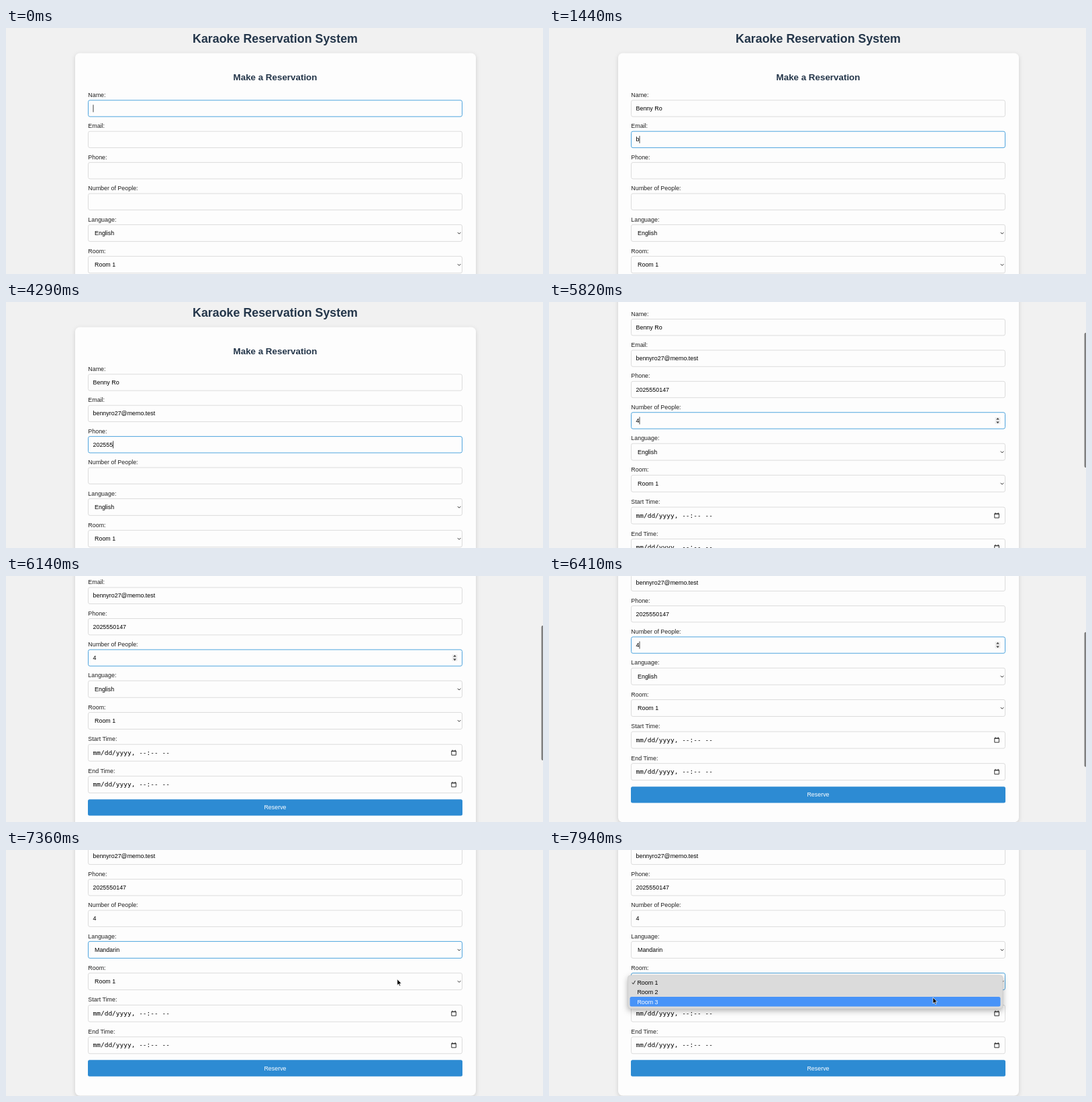
Animation, 800 px wide and 367 px high, one loop 7990 ms. Source, as an HTML page:

```html
<!DOCTYPE html>
<html lang="en">
<head>
<meta charset="utf-8">
<title>Karaoke Reservation System</title>
<style>
  html, body { margin: 0; width: 100%; height: 100%; overflow: hidden; background: #f1f1f1; }
  svg { display: block; width: 800px; height: 367px; }
  text { font: 8.92px "Liberation Sans", Arial, sans-serif; fill: #000; white-space: pre; }
  .label { fill: #222; }
  .heading { font-weight: bold; fill: #24364a; text-anchor: middle; }
  .date { font: 9.5px "DejaVu Sans Mono", monospace; }
  .white { fill: #fff; }
  .middle { text-anchor: middle; }
  .card { fill: #fdfdfd; filter: drop-shadow(0 2px 3px rgba(0, 0, 0, .14)); }
  .box { fill: #fdfdfd; stroke: #dcdcdc; }
  .box.focus { stroke: #4fa5de; }
  .icon { fill: none; stroke: #333; }
  .menu { fill: #dbdbdb; stroke: #c2c2c2; stroke-width: .5; filter: drop-shadow(0 3px 4px rgba(0, 0, 0, .3)); }
</style>
</head>
<body>
<svg viewBox="0 0 800 367">
  <g id="page">
    <text class="heading" x="401" y="22" style="font-size:17.85px">Karaoke Reservation System</text>
    <rect class="card" x="103" y="37.5" width="597" height="486" rx="7"/>
    <text class="heading" x="401" y="77.5" style="font-size:13.39px">Make a Reservation</text>
    <g id="form"></g>
    <rect x="122" y="470.3" width="558" height="24.4" rx="2.5" fill="#2d8bd3"/>
    <text class="white middle" x="401" y="485.6">Reserve</text>
    <rect id="caret" width=".8" height="11" fill="#111"/>
  </g>
  <rect id="thumb" x="797.5" width="4" height="201" rx="2" fill="#808080"/>
  <g id="menus"></g>
  <path id="pointer" d="M0 0V9L2.1 7.2L3.6 10.4L5 9.8L3.6 6.7H6.4Z" stroke="#fff" stroke-width=".7"/>
</svg>
<script>
const LOOP = 7990;
const $ = id => document.getElementById(id);
const clamp = (v, lo, hi) => Math.min(hi, Math.max(lo, v));
const show = (node, on) => node.setAttribute('visibility', on ? 'visible' : 'hidden');

// Fields: top edge of the box, height, and typing schedule where one exists
const fields = [
  { label: 'Name', top: 107.5, h: 25, focus: 0, text: 'Benny Ro', start: 200, step: 140 },
  { label: 'Email', top: 153.9, h: 25, focus: 1380, text: 'bennyro27@memo.test', start: 1430, step: 118 },
  { label: 'Phone', top: 200.3, h: 25, focus: 3820, text: '2025550147', start: 3870, step: 80 },
  { label: 'Number of People', top: 246.7, h: 25, focus: 4950, text: '4', start: 5350, step: 100 },
  { label: 'Language', top: 293.1, h: 25.6, focus: 6580, kind: 'select' },
  { label: 'Room', top: 340.3, h: 25.6, focus: 7450, kind: 'select' },
  { label: 'Start Time', top: 388, h: 25.6, kind: 'date' },
  { label: 'End Time', top: 435.5, h: 25.6, kind: 'date' }
];

const menus = [
  { top: 139.5, open: 6580, close: 7060, items: ['English', 'Mandarin', 'Korean', 'Japanese', 'Spanish', 'French', 'Other'],
    hover: t => t < 6680 ? 0 : 1 },
  { top: 187, open: 7450, close: LOOP, items: ['Room 1', 'Room 2', 'Room 3'],
    hover: t => t < 7600 ? 0 : t < 7760 ? 1 : 2 }
];

const pointerPath = [[6430, 612, 132], [6580, 607, 146], [6740, 605, 156], [7060, 605, 157],
                     [7400, 582, 194], [7480, 580, 195], [7820, 572, 220], [LOOP, 572, 220]];

function fieldMarkup({ label, top, h, kind }, i) {
  const mid = top + h / 2;
  const chevron = `<path class="icon" d="M672.8 ${mid - 1}l2.3 2.3l2.3 -2.3"/>`;
  const calendar = `<path class="icon" d="M663.8 ${mid - 2.7}h6.6v6.2h-6.6zM663.5 ${mid - 2.2}h7.2M665 ${mid - 4.3}v2M669.2 ${mid - 4.3}v2"/>`;
  const spinner = `<g id="spinner"><rect x="664.5" y="${mid - 5}" width="8" height="10" rx="1" fill="#eee"/>
    <path d="M666.2 ${mid - 1.5}h4.6l-2.3 -2.8zM666.2 ${mid + 1.5}h4.6l-2.3 2.8z" fill="#444"/></g>`;
  const extra = kind === 'select' ? chevron : kind === 'date' ? calendar : i === 3 ? spinner : '';
  const initial = kind === 'date' ? 'mm/dd/yyyy, --:-- --' : '';
  return `<text class="label" x="122.3" y="${top - 4.6}">${label}:</text>
    <rect class="box" id="box${i}" x="122.5" y="${top + .3}" width="557" height="${h - .6}" rx="2.5"/>
    <text class="${kind || ''}" id="value${i}" x="${kind === 'select' ? 132 : 129.5}" y="${mid + 3}">${initial}</text>${extra}`;
}

function menuMarkup({ top, items }, i) {
  const rows = items.map((item, n) =>
    `<text x="131.4" y="${top + 13.7 + n * 14.5}">${item}</text>`).join('');
  return `<g id="menu${i}">
    <rect class="menu" x="117.5" y="${top}" width="558.5" height="${items.length * 14.5 + 6.2}" rx="4"/>
    <rect class="hover" x="120.5" width="552" height="14.5" rx="2.5" fill="#4793f8"/>
    <path class="icon check" d="M123.8 ${top + 10.8}l1.7 2.3l3 -5.2"/>${rows}</g>`;
}

$('form').innerHTML = fields.map(fieldMarkup).join('');
$('menus').innerHTML = menus.map(menuMarkup).join('');

function pointerAt(t) {
  const n = clamp(pointerPath.findIndex(p => p[0] > t), 1, pointerPath.length - 1);
  const [t0, x0, y0] = pointerPath[n - 1], [t1, x1, y1] = pointerPath[n];
  const u = clamp((t - t0) / (t1 - t0), 0, 1), k = u * u * (3 - 2 * u);
  return [x0 + (x1 - x0) * k, y0 + (y1 - y0) * k];
}

function drawFields(t) {
  const active = fields.findLastIndex(f => f.focus <= t);
  fields.forEach((field, i) => {
    $('box' + i).classList.toggle('focus', i === active);
    if (!field.text) return;
    const count = clamp(Math.floor((t - field.start) / field.step) + 1, 0, field.text.length);
    const value = $('value' + i);
    value.textContent = field.text.slice(0, count);
    if (i !== active) return;
    const lastKey = count ? field.start + (count - 1) * field.step : field.focus;
    $('caret').setAttribute('x', 129.6 + (count ? value.getComputedTextLength() : 0));
    $('caret').setAttribute('y', field.top + 7);
    show($('caret'), Math.floor((t - lastKey) / 500) % 2 === 0);
  });
  if (!fields[active].text) show($('caret'), false);
  show($('spinner'), active === 3);
  $('value4').textContent = t < menus[0].close ? 'English' : 'Mandarin';
  $('value5').textContent = 'Room 1';
}

function drawMenu(menu, i, t) {
  const group = $('menu' + i), hover = menu.hover(t);
  show(group, t >= menu.open && t < menu.close);
  group.querySelector('.hover').setAttribute('y', menu.top + 3.1 + hover * 14.5);
  group.querySelector('.check').style.stroke = hover ? '#222' : '#fff';
  group.querySelectorAll('text').forEach((row, n) => row.classList.toggle('white', n === hover));
}

function draw(t) {
  const left = 1 - clamp((t - 5524) / 958, 0, 1);
  const scroll = 157 * (1 - left * left);
  $('page').setAttribute('transform', `translate(0 ${-scroll})`);
  $('thumb').setAttribute('y', 4 + scroll * .51);
  $('thumb').setAttribute('opacity', t < 5524 ? 0 : clamp((6720 - t) / 200, 0, 1));
  drawFields(t);
  menus.forEach((menu, i) => drawMenu(menu, i, t));
  $('pointer').setAttribute('transform', `translate(${pointerAt(t)})`);
  show($('pointer'), t >= pointerPath[0][0]);
}

function tick() {
  draw(performance.now() % LOOP);
  requestAnimationFrame(tick);
}
tick();
</script>
</body>
</html>
```
